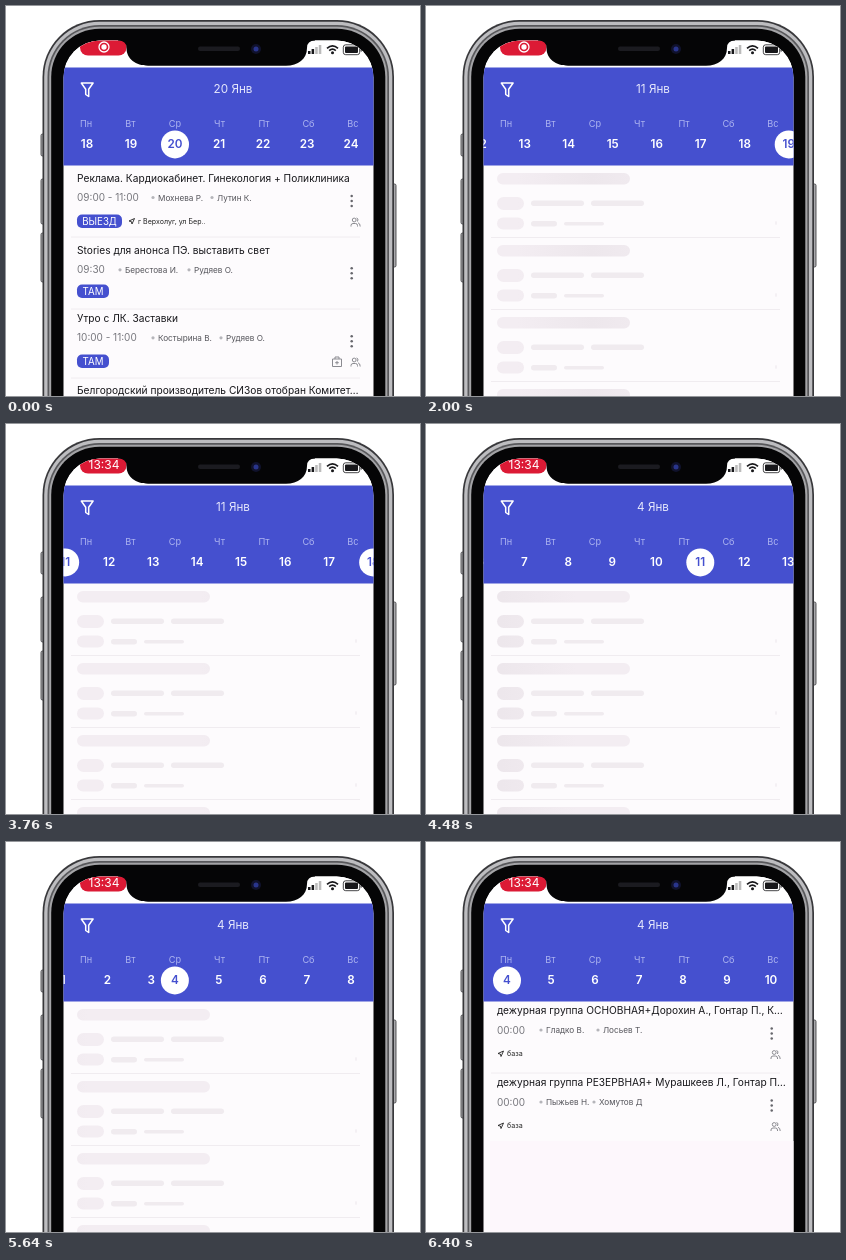
Write an HTML page that moves like this. It is 414x390 px and loops after 6440 ms.

```html
<!DOCTYPE html>
<html lang="ru">
<head>
<meta charset="utf-8">
<style>
  html, body { margin: 0; width: 100%; height: 100%; overflow: hidden; background: #fff; }
  svg { display: block; width: 414px; height: 390px; font-family: Inter, Roboto, sans-serif; }
  .mid { text-anchor: middle; }
  .title { font-size: 10.2px; fill: #17171b; }
  .time { font-size: 10px; fill: #77777d; }
  .name { font-size: 8.2px; fill: #55555b; }
  .place { font-size: 7.1px; fill: #222; }
  .badge { font-size: 9.7px; fill: #fff; }
  .day { font-size: 11.7px; font-weight: 600; fill: #fff; text-anchor: middle; }
  .on { fill: #4550cf; }
  .line { fill: none; stroke: #8b8b91; stroke-width: 1; }
</style>
</head>
<body>
<svg viewBox="0 0 414 390">
  <defs>
    <clipPath id="screen"><rect x="57.5" y="34.5" width="310" height="420" rx="37"/></clipPath>
    <linearGradient id="shine" gradientUnits="userSpaceOnUse" x1="0" x2="150">
      <stop stop-color="#f3edf2"/><stop offset=".5" stop-color="#ede7ec"/><stop offset="1" stop-color="#f3edf2"/>
    </linearGradient>
  </defs>

  <g fill="#a9a9ac" stroke="#48484b" stroke-width=".9">
    <rect x="35" y="128" width="4" height="22" rx="1.5"/>
    <rect x="35" y="173" width="4" height="45" rx="1.5"/>
    <rect x="35" y="227" width="4" height="49" rx="1.5"/>
    <rect x="386" y="178" width="4" height="83" rx="1.5"/>
  </g>
  <g id="body"></g>

  <g clip-path="url(#screen)">
    <rect x="57" y="34" width="311" height="356" fill="#fdfbfd"/>
    <g id="first"></g>
    <g id="loading"></g>
    <g id="last"></g>

    <rect x="57" y="34" width="311" height="28" fill="#fff"/>
    <rect x="74" y="29" width="46.5" height="20.5" rx="8" fill="#dc1a35"/>
    <g id="rec" fill="none" stroke="#fff" stroke-width="1.3">
      <circle cx="98" cy="41" r="5"/><circle cx="98" cy="41" r="2" fill="#fff"/>
    </g>
    <text id="clock" class="mid" x="98" y="45.3" font-size="12" fill="#fff">13:34</text>
    <g fill="#17171a">
      <rect x="302" y="45" width="2.5" height="3"/>
      <rect x="305.6" y="43" width="2.5" height="5"/>
      <rect x="309.2" y="41" width="2.5" height="7" fill="#bbb"/>
      <rect x="312.8" y="39" width="2.5" height="9" fill="#bbb"/>
      <circle cx="326.5" cy="46.8" r="1.5"/>
      <rect x="339" y="40.5" width="13" height="6.5" rx="1"/>
      <rect x="354.6" y="42" width="1.2" height="3.5"/>
    </g>
    <g fill="none" stroke="#17171a">
      <path d="M321 42.3q5.5-5 11 0M323.2 44.7q3.3-3 6.6 0" stroke-width="1.7"/>
      <rect x="337.3" y="38.8" width="16.4" height="9.9" rx="2.4" stroke-width=".8"/>
    </g>

    <rect x="57" y="61.5" width="311" height="98" fill="#4550cf"/>
    <path d="M75.3 77h11.8l-4.4 6.2v7.3l-3-2v-5.3z" fill="none" stroke="#fff" stroke-width="1.5" stroke-linejoin="round"/>
    <text id="date" class="mid" x="227" y="87" font-size="11.7" fill="#e6e8fc"></text>
    <g id="week" class="mid" font-size="9.2" fill="#adb4f0"></g>
    <g id="strip"></g>
  </g>

  <path d="M112 32V34.5Q120.500 34.500 120.500 42C120.500 53 130 59.700 142 59.700H280C292 59.700 301 53 301 42Q301 34.500 309 34.500V32Z" fill="#050506"/>
  <rect x="192" y="40.5" width="42" height="4.5" rx="2.2" fill="#1b1b20"/>
  <circle cx="250" cy="43" r="5" fill="#10122c"/>
  <circle cx="250" cy="43" r="2.5" fill="#29358c"/>
</svg>
<script>
const LOOP = 6440, TAP = 360, LOADED = 5800, CLOCK = 2500, SWIPE = 360, PAGE = 308;
// Swipes: start time and direction (1 = one week back)
const swipes = [[1861, 1], [2829, -1], [3550, 1], [4380, 1], [5000, 1], [5518, -1]];
const el = id => document.getElementById(id);
const text = (cls, x, y, s) => `<text class="${cls}" x="${x}" y="${y}">${s}</text>`;
const bar = (x, y, w, h, fill) => `<rect x="${x}" y="${y}" width="${w}" height="${h}" rx="${h / 2}" fill="${fill}"/>`;
const rule = y => `<path d="M65 ${y}H354" stroke="#f0ecf0"/>`;
const pin = (x, y) => `<path transform="translate(${x} ${y})" d="M0 0l5.5-2.5-2.5 5.5-.6-2.4z" fill="none" stroke="#222" stroke-width=".9"/>`;
const people = y => `<path class="line" transform="translate(345 ${y})" d="M0 4.5v-1q0-2 2-2h2.5q2 0 2 2v1M7 .8q2.2.5 2.2 3.7M5.5-4q2.5.4 1 3.5"/><circle class="line" cx="348.2" cy="${y - 2}" r="1.9"/>`;
const menu = y => [-5, 0, 5].map(d => `<circle cx="345.7" cy="${y + d}" r="1.25" fill="#66666c"/>`).join('');
const badge = (y, w, s) => `<rect x="71" y="${y - 6.5}" width="${w}" height="13.5" rx="5" fill="#4550cf"/>` +
  text('badge mid', 71 + w / 2, y + 3.7, s);
const people2 = (y, names) => names.map(([x, s]) =>
  `<circle cx="${x}" cy="${y - 3}" r="1.6" fill="#b5b5ba"/>` + text('name', x + 5, y, s)).join('');
const head = (y, title, time, names) =>
  text('title', 71, y + 3.7, title) + text('time', 71, y + 23, time) + people2(y + 22.5, names) + menu(y + 23);

// Phone body: nested rings from the outer edge to the black bezel
el('body').innerHTML = [[0, '#38383b'], [1.7, '#bdbdc0'], [5, '#58585b'], [6.7, '#a4a4a7'], [8.7, '#050506']].map(([d, fill]) =>
  `<rect x="${36.5 + d}" y="${14 + d}" width="${351.5 - 2 * d}" height="460" rx="${57 - d}" fill="${fill}"/>`).join('');

el('first').innerHTML =
  head(172, 'Реклама. Кардиокабинет. Гинекология + Поликлиника', '09:00 - 11:00', [[147, 'Мохнева Р.'], [206, 'Лутин К.']]) +
  badge(215, 45, 'ВЫЕЗД') + pin(123, 215) + text('place', 132, 218, 'г Верхолуг, ул Бер..') + people(216) + rule(231) +
  head(244.3, 'Stories для анонса ПЭ. выставить свет', '09:30', [[114, 'Берестова И.'], [183, 'Рудяев О.']]) +
  badge(285, 32, 'ТАМ') + rule(303) +
  head(312.3, 'Утро с ЛК. Заставки', '10:00 - 11:00', [[147, 'Костырина В.'], [215, 'Рудяев О.']]) +
  badge(355, 32, 'ТАМ') + people(356) +
  '<path class="line" d="M326.5 353h9v7.5h-9zM329 353v-2h4v2M331 355v3.5M329.2 356.7h3.6"/>' + rule(372) +
  text('title', 71, 388, 'Белгородский производитель СИЗов отобран Комитет…');

const duty = (y, title, names) => head(y, title, '00:00', names) + pin(72, y + 43) +
  text('place', 81, y + 45.5, 'база') + people(y + 44);
el('last').innerHTML =
  duty(168.5, 'дежурная группа ОСНОВНАЯ+Дорохин А., Гонтар П., К…', [[115, 'Гладко В.'], [172, 'Лосьев Т.']]) + rule(231) +
  duty(240.5, 'дежурная группа РЕЗЕРВНАЯ+ Мурашкеев Л., Гонтар П…', [[115, 'Пыжьев Н.'], [168, 'Хомутов Д']]) +
  '<rect x="64" y="299" width="304" height="91" fill="#fdf7fc"/>';

el('loading').innerHTML = [0, 72, 144, 216].map(d => {
  const s = 'url(#shine)', thin = '#f0ebef';
  return bar(71, 167 + d, 133, 11.5, s) + bar(71, 191 + d, 27, 13, s) + bar(105, 194.5 + d, 53, 5.5, thin) +
    bar(165, 194.5 + d, 53, 5.5, thin) + bar(71, 211.5 + d, 27, 12, s) + bar(105, 215 + d, 26, 5.5, thin) +
    bar(138, 216 + d, 40, 3.5, thin) + bar(349, 215 + d, 2, 4, '#f3eff3') + rule(231.5 + d);
}).join('');

el('week').innerHTML = ['Пн', 'Вт', 'Ср', 'Чт', 'Пт', 'Сб', 'Вс'].map((s, i) => text('', 80 + i * 44.5, 121, s)).join('');

function pageAt(t) {
  let pos = 0, forward = false;
  for (const [start, dir] of swipes) {
    const u = Math.min(1, Math.max(0, (t - start) / SWIPE));
    pos += dir * (1 - (1 - u) ** 3);
    if (u > 0 && u < 1) forward = dir < 0;
  }
  return [pos, forward];
}

const dateOf = (page, i) => new Date(2021, 0, 18 - 7 * page + i);

function drawStrip(pos, forward, picked) {
  let out = '';
  const near = Math.floor(pos + 1e-6), off = (pos - near) * PAGE;
  for (const page of [near + 1, near]) {
    // The older week trails a little behind on the way forward
    const lag = forward && page > near ? Math.min(off, 16 + off * .05, (PAGE - off) * .3) : 0;
    for (let i = 0; i < 7; i++) {
      const x = 81 + i * 44 + (pos - page) * PAGE + lag;
      if (x < 40 || x > 385) continue;
      const on = i === (page === 0 ? picked : 0);
      if (on) out += `<circle cx="${x}" cy="138.4" r="14" fill="#fff"/>`;
      out += text(on ? 'day on' : 'day', x, 142.3, dateOf(page, i).getDate());
    }
  }
  el('strip').innerHTML = out;
}

const show = (id, on) => el(id).style.display = on ? '' : 'none';

function frame(now) {
  const t = now % LOOP, [pos, forward] = pageAt(t);
  const picked = t < TAP ? 2 : t < CLOCK ? 1 : 0;
  const page = Math.round(pos), day = dateOf(page, page ? 0 : picked);
  el('date').textContent = day.getDate() + (day.getMonth() ? ' Дек' : ' Янв');
  drawStrip(pos, forward, picked);
  show('first', t < TAP);
  show('loading', t >= TAP && t < LOADED);
  show('last', t >= LOADED);
  show('rec', t < CLOCK);
  show('clock', t >= CLOCK);
  el('shine').setAttribute('gradientTransform', `translate(${-80 + (t % 1400) / 1400 * 400})`);
  requestAnimationFrame(frame);
}
requestAnimationFrame(frame);
</script>
</body>
</html>
```
